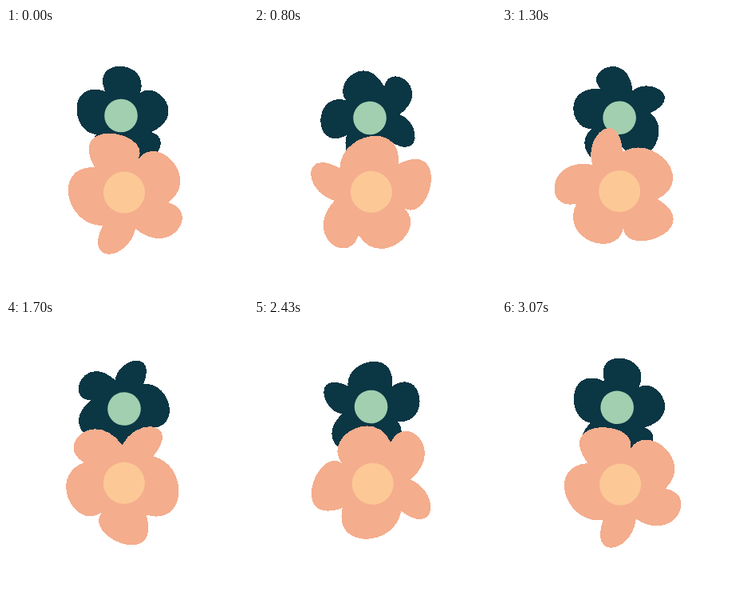
Recreate the animation shown at these times as an HTML page. Size 303 by 330 pixels, loop 3130 ms.

```html
<!DOCTYPE html>
<html lang="en">
<head>
<meta charset="utf-8">
<title>Turning flowers</title>
<style>
  html, body { margin: 0; width: 100%; height: 100%; overflow: hidden; background: #fff; }
  svg { display: block; width: 100%; height: 100%; }
  path { shape-rendering: crispEdges; }
</style>
</head>
<body>
<!-- One curve per petal, from inner corner to inner corner. -->
<svg viewBox="0 0 303 330">
  <g id="back">
    <path fill="#0b3644" d="M124 79
      C105 35 182 39 168 81
      C189 65 228 109 182 130
      C214 139 175 191 146 147
      C137 172 85 173 113 133
      C81 131 76 64 124 79Z"/>
    <circle cx="144" cy="109.5" r="20.8" fill="#a1cfaf"/>
  </g>
  <g id="front">
    <path fill="#f4ad8d" d="M111 174
      C75 111 182 128 166 163
      C192 132 244 189 203 218
      C244 229 207 288 162 251
      C153 291 97 297 121 247
      C75 248 57 172 111 174Z"/>
    <circle cx="148" cy="205.6" r="26" fill="#fcc996"/>
  </g>
</svg>
<script>
const LOOP = 3130, POSES = 50;
const back = document.getElementById('back');
const front = document.getElementById('front');
const start = performance.now();

// 16 poses a second, shown on a 30 per second clock that is rounded to 10 ms.
function poseAt(time) {
  const tick = Math.floor((Math.floor(time / 10) + 0.5) * 0.3);
  return Math.ceil((tick + 0.5) * 16 / 30) - 1;
}

function turn(flower, angle, x, y) {
  flower.setAttribute('transform', `rotate(${angle} ${x} ${y})`);
}

function draw() {
  const angle = poseAt((performance.now() - start) % LOOP) * 360 / POSES;
  turn(back, -angle, 145.9, 110.5);
  turn(front, angle, 147.8, 204.7);
  requestAnimationFrame(draw);
}
draw();
</script>
</body>
</html>
```
